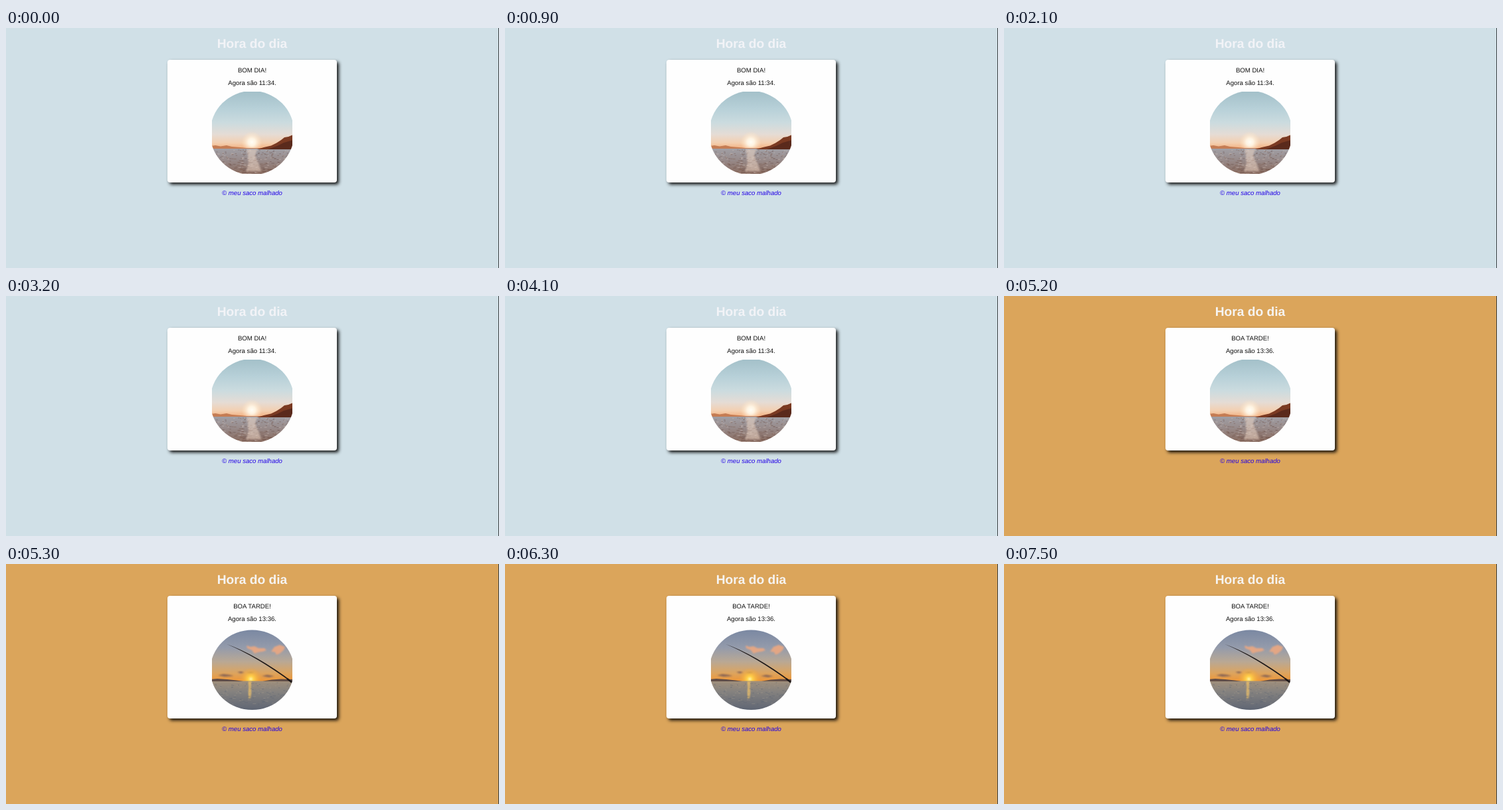
Write an HTML page that moves like this. It is 742 px wide and 362 px high and loops after 8000 ms.

```html
<!DOCTYPE html>
<html lang="pt">
<head>
<meta charset="utf-8">
<title>Hora do dia</title>
<style>
  html, body { margin: 0; width: 100%; height: 100%; overflow: hidden; }
  body { position: relative; background: #d0e0e7; animation: page 8s step-end infinite; }
  .card {
    position: absolute; left: 243px; top: 48px; width: 255px; height: 185px;
    border-radius: 4px; background: #fefefe; box-shadow: 3px 3px 5px rgba(0, 0, 0, .9);
  }
  svg { position: absolute; left: 0; top: 0; display: block; }
  text {
    font: 9.6px "Liberation Sans", Arial, sans-serif; text-anchor: middle; fill: #111;
    text-rendering: geometricPrecision;
  }
  .title { font-size: 19.2px; font-weight: bold; fill: #f2f3f7; animation: title 8s step-end infinite; }
  .link { font-style: italic; fill: #2200e6; }
  .am { animation: leave 8s step-end infinite; }
  .pm { animation: enter 8s step-end infinite; }
  .photo { animation-name: leavePhoto; }
  .pm.photo { animation-name: enterPhoto; }
  @keyframes page { 65%, 100% { background: #dba55b; } }
  @keyframes title { 65%, 100% { fill: #f6f4f2; } }
  @keyframes leave { 0% { opacity: 1; } 65%, 100% { opacity: 0; } }
  @keyframes enter { 0% { opacity: 0; } 65%, 100% { opacity: 1; } }
  @keyframes leavePhoto { 0% { opacity: 1; } 66.25%, 100% { opacity: 0; } }
  @keyframes enterPhoto { 0% { opacity: 0; } 66.25%, 100% { opacity: 1; } }
</style>
</head>
<body>
<div class="card"></div>
<svg width="742" height="362" viewBox="0 0 742 362">
  <defs>
    <clipPath id="frame"><rect x="310" y="96.3" width="121" height="123.7"/></clipPath>
    <clipPath id="round"><circle cx="370.5" cy="158.2" r="63.4"/></clipPath>
    <clipPath id="oval"><ellipse cx="370.5" cy="159.8" rx="63" ry="60.3"/></clipPath>
    <linearGradient id="amSky" x2="0" y2="1">
      <stop stop-color="#a3c0c9"/><stop offset=".3" stop-color="#b7d0d8"/>
      <stop offset=".55" stop-color="#cbdbdf"/><stop offset=".75" stop-color="#e5dcd5"/>
      <stop offset=".9" stop-color="#f3cfb0"/><stop offset="1" stop-color="#f2b080"/>
    </linearGradient>
    <linearGradient id="amSea" x2="0" y2="1">
      <stop stop-color="#a09fa5"/><stop offset=".4" stop-color="#988c8c"/>
      <stop offset="1" stop-color="#87685b"/>
    </linearGradient>
    <linearGradient id="pmSky" x2="0" y2="1">
      <stop stop-color="#7a88a2"/><stop offset=".35" stop-color="#949bab"/>
      <stop offset=".62" stop-color="#b9a894"/><stop offset=".84" stop-color="#dca45f"/>
      <stop offset="1" stop-color="#ee9636"/>
    </linearGradient>
    <linearGradient id="pmSea" x2="0" y2="1">
      <stop stop-color="#a08f7b"/><stop offset=".35" stop-color="#85827f"/>
      <stop offset="1" stop-color="#5d6473"/>
    </linearGradient>
    <radialGradient id="amSun">
      <stop stop-color="#fffdf6"/><stop offset=".35" stop-color="#fff5e4" stop-opacity=".95"/>
      <stop offset="1" stop-color="#ffe0bd" stop-opacity="0"/>
    </radialGradient>
    <radialGradient id="pmSun">
      <stop stop-color="#fff4a0"/><stop offset=".25" stop-color="#ffd04a"/>
      <stop offset="1" stop-color="#f7a02c" stop-opacity="0"/>
    </radialGradient>
    <filter id="soft"><feGaussianBlur stdDeviation=".9"/></filter>
  </defs>

  <text class="title" x="370.5" y="30.3">Hora do dia</text>
  <g class="am">
    <text x="370.5" y="67.4">BOM DIA!</text>
    <text x="370.5" y="86.4">Agora são 11:34.</text>
  </g>
  <g class="pm">
    <text x="370.5" y="67.4">BOA TARDE!</text>
    <text x="370.5" y="86.4">Agora são 13:36.</text>
  </g>
  <text class="link" x="370.5" y="251.8">© meu saco malhado</text>

  <g clip-path="url(#frame)">
    <g class="am photo"><g clip-path="url(#round)">
      <rect x="306" y="95" width="130" height="87" fill="url(#amSky)"/>
      <circle cx="370" cy="172" r="16" fill="url(#amSun)"/>
      <path d="M306 178.500l9-1.500 8 1.500 9-1.500 8 2 12 1 10 1h30v2H306z" fill="#c57d54"/>
      <rect x="306" y="182" width="130" height="40" fill="url(#amSea)"/>
      <g id="amWaves"></g>
      <path d="M362 183h16l-3 9 5 12 4 12h-22l3-13-1-11z" fill="#f3dccb" opacity=".5" filter="url(#soft)"/>
      <path d="M378 183l10-3 11-2.500 8-4 7-4.500 5-4 6-1 7-3v22z" fill="#7a3a22"/>
      <path d="M394 183l14-5 10-5 14-4v14z" fill="#5a2a1c"/>
    </g></g>
    <g class="pm photo"><g clip-path="url(#oval)">
      <rect x="306" y="99" width="130" height="78" fill="url(#pmSky)"/>
      <g fill="#e3a684" filter="url(#soft)">
        <path d="M362 123l6 2 6-1 6 3 9 0 3 3-5 2-7 1-6 2-4-5-7-3z"/>
        <path d="M399 132l5-7 8-3 8 3-2 5-6 5-5 2-2-4z"/>
      </g>
      <g fill="#8d6855" filter="url(#soft)">
        <path d="M319 168l8-2 9 1 7 2-14 1z"/>
        <path d="M348 163l6-1 5 2-6 1zM362 164l7-1 5 1-6 1zM385 169l8-2 11 2-8 2z"/>
      </g>
      <circle cx="368.5" cy="173.5" r="17" fill="url(#pmSun)"/>
      <rect x="306" y="176.5" width="130" height="45" fill="url(#pmSea)"/>
      <path d="M306 174l12-1 15 1 14 1.500 10 1.500h-51zM386 176.800l14-2.300 14-1 20 .5v3z" fill="#604d47"/>
      <path d="M364.500 177h5l-1 8 1 9-2 9h-2l-1-9 1-8z" fill="#f5c566" opacity=".75" filter="url(#soft)"/>
      <g id="pmWaves"></g>
      <path d="M332 120.800Q377 137 431 177.500V179.500Q376 139 332 120.800z" fill="#1c1717"/>
      <path d="M423 173l8 6" stroke="#1c1717" stroke-width="2.500"/>
    </g></g>
  </g>
  <rect x="741" width="1" height="362" fill="#3c4143"/>
</svg>
<script>
  // Seeded ripples, longer towards the shore
  function waves(id, top, count, colors, seed) {
    const rand = () => (seed = seed * 16807 % 2147483647) / 2147483647;
    const lines = colors.map(() => '');
    for (let i = 0; i < count; i++) {
      const depth = rand();
      const x = 308 + rand() * 122;
      const y = top + depth * (220 - top);
      const len = 2 + depth * 5 * rand();
      lines[i % colors.length] += `M${x.toFixed(1)} ${y.toFixed(1)}h${len.toFixed(1)}`;
    }
    document.getElementById(id).innerHTML = lines.map((d, i) =>
      `<path d="${d}" stroke="${colors[i]}" stroke-width=".8" opacity=".5"/>`).join('');
  }
  waves('amWaves', 184, 300, ['#5c403b', '#dccbc2', '#74503f'], 71);
  waves('pmWaves', 179, 170, ['#596273', '#a39a8d'], 29);
</script>
</body>
</html>
```
